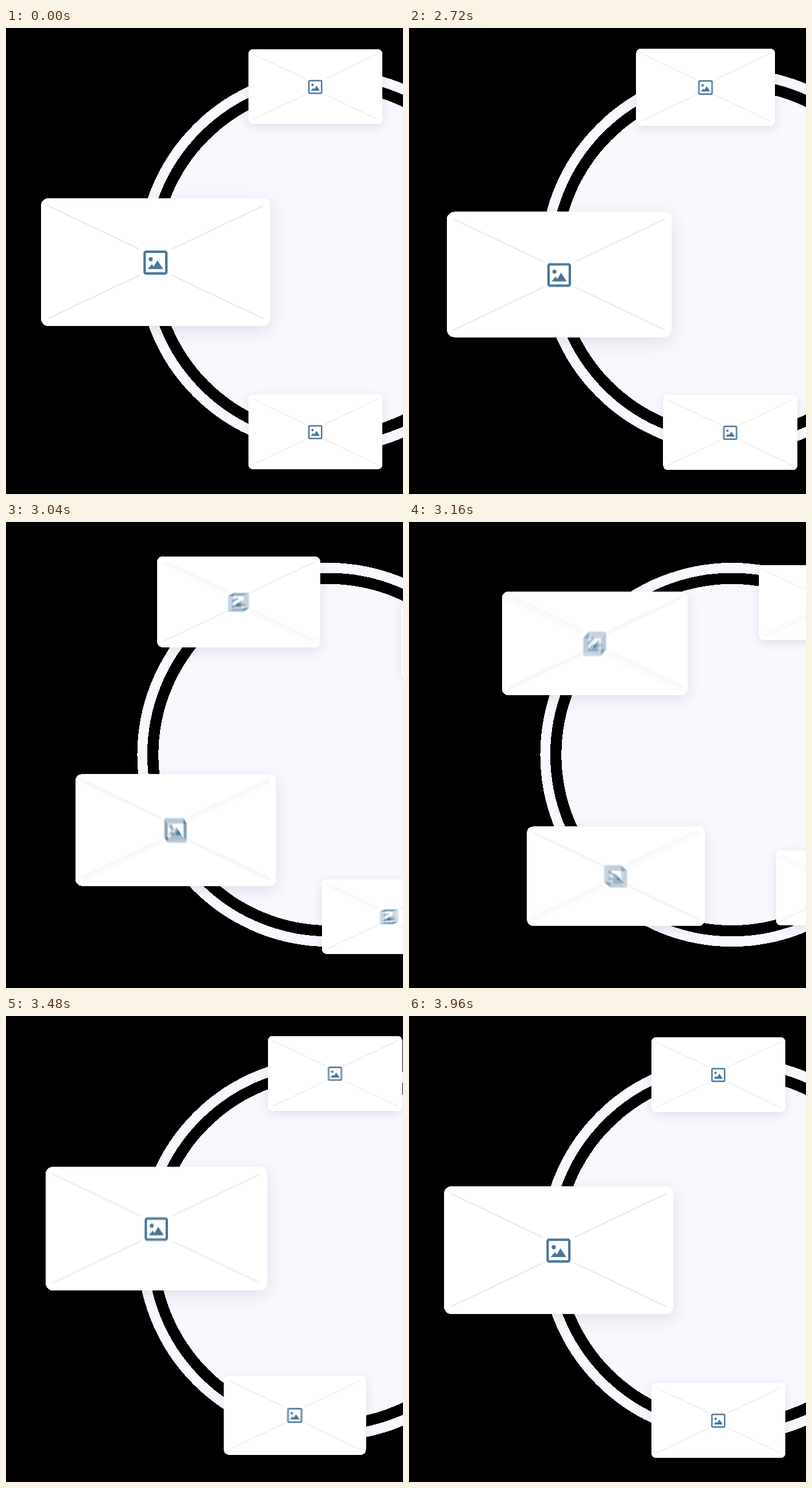
Write an HTML page with a canvas that moves like this. It is 691 px wide and 810 px high and loops after 4.84 s.

```html
<!DOCTYPE html>
<html lang="en">
<head>
<meta charset="utf-8">
<title>Card wheel</title>
<style>
  html, body { margin: 0; width: 100%; height: 100%; overflow: hidden; background: #000; }
  canvas { display: block; filter: url(#hard); }
  svg { position: absolute; }
</style>
</head>
<body>
<canvas id="stage" width="691" height="810"></canvas>
<!-- One-bit transparency: outlines against the backdrop are hard. -->
<svg width="0" height="0">
  <filter id="hard" x="0" y="0" width="1" height="1" color-interpolation-filters="sRGB">
    <feComponentTransfer><feFuncA type="discrete" tableValues="0 1"/></feComponentTransfer>
  </filter>
</svg>
<script>
const W = 691, H = 810;
const ctx = document.getElementById('stage').getContext('2d');
const layer = document.createElement('canvas');
layer.width = W;
layer.height = H;
const art = layer.getContext('2d');

const LOOP = 4840, START = 2372, SPAN = 1540, SHUTTER = 15, SAMPLES = 12;
const HUB = { x: 560, y: 402 };
const CARD = { w: 399, h: 222, r: 13 };
const SMALL = 233 / 399;
const BLUE = '#4a769c', PALE = '#f8f9ff';

// Each card travels one place counterclockwise; bend shifts its radius on the way.
const cards = [
  { from: [870, 320], to: [538.5, 102], size: [SMALL, SMALL], bend: () => 0 },
  { from: [538.5, 102], to: [260.5, 407], size: [SMALL, 1], bend: p => 34 * p * (1 - p) ** 2 },
  { from: [260.5, 407], to: [538.5, 703], size: [1, SMALL], bend: p => -61 * p * p * (1 - p) },
  { from: [538.5, 702], to: [861, 470], size: [SMALL, SMALL], bend: () => 0 }
];

const mix = (a, b, p) => a + (b - a) * p;

function polar([x, y]) {
  const dx = HUB.x - x, dy = y - HUB.y;
  return { a: Math.atan2(dy, dx), r: Math.hypot(dx, dy) };
}

for (const c of cards) {
  c.p0 = polar(c.from);
  c.p1 = polar(c.to);
}

// cubic-bezier(.7, 0, .3, 1)
function ease(x) {
  if (x <= 0) return 0;
  if (x >= 1) return 1;
  let lo = 0, hi = 1, s = 0.5;
  for (let i = 0; i < 24; i++) {
    s = (lo + hi) / 2;
    const v = 1 - s;
    if (2.1 * s * v * v + 0.9 * s * s * v + s ** 3 < x) lo = s; else hi = s;
  }
  return s * s * (3 - 2 * s);
}

function pose(c, t) {
  const p = ease((t - START) / SPAN);
  const a = mix(c.p0.a, c.p1.a, p);
  const r = mix(c.p0.r, c.p1.r, p) + c.bend(p);
  return {
    x: HUB.x - r * Math.cos(a),
    y: HUB.y + r * Math.sin(a),
    s: mix(c.size[0], c.size[1], p)
  };
}

function outline({ x, y, s }) {
  const path = new Path2D();
  path.roundRect(x - CARD.w * s / 2, y - CARD.h * s / 2, CARD.w * s, CARD.h * s, CARD.r * s);
  return path;
}

function drawWheel() {
  ctx.fillStyle = ctx.strokeStyle = PALE;
  ctx.beginPath();
  ctx.arc(562, 404.5, 296.7, 0, Math.PI * 2);
  ctx.fill();
  ctx.lineWidth = 17.5;
  ctx.beginPath();
  ctx.arc(562, 404.5, 324.8, 0, Math.PI * 2);
  ctx.stroke();
}

function drawBody(path, s) {
  ctx.save();
  ctx.shadowColor = 'rgba(45, 25, 55, 0.12)';
  ctx.shadowBlur = 30 * s;
  ctx.shadowOffsetY = 8 * s;
  ctx.fillStyle = '#fff';
  ctx.fill(path);
  ctx.restore();
}

function drawFace({ x, y, s }) {
  art.save();
  art.translate(x, y);
  art.scale(s, s);

  art.strokeStyle = '#e8e8e8';
  art.lineWidth = 2;
  art.beginPath();
  for (const sx of [-1, 1]) for (const sy of [-1, 1]) {
    art.moveTo(sx * 187, sy * 98);
    art.lineTo(sx * 28, sy * 22.5);
  }
  art.stroke();

  art.translate(-0.3, 0.8);
  art.strokeStyle = art.fillStyle = BLUE;
  art.lineWidth = 4.2;
  art.beginPath();
  art.roundRect(-18.9, -18.9, 37.8, 37.8, 2.5);
  art.stroke();
  art.beginPath();
  art.arc(-8.3, -6, 3.6, 0, Math.PI * 2);
  art.fill();
  art.beginPath();
  art.moveTo(-13.5, 11.3);
  art.lineTo(-6.5, 3);
  art.lineTo(-3, 7);
  art.lineTo(3.3, -4);
  art.lineTo(13.5, 11.3);
  art.fill();
  art.restore();
}

// Averages several moments inside the shutter time for motion blur.
function drawFaces(clip, t) {
  const n = t > START && t < START + SPAN ? SAMPLES : 1;
  ctx.save();
  ctx.clip(clip);
  for (let k = 0; k < n; k++) {
    const moment = t + ((k + 0.5) / n - 0.5) * SHUTTER;
    art.fillStyle = '#fff';
    art.fillRect(0, 0, W, H);
    for (const c of cards) drawFace(pose(c, moment));
    ctx.globalAlpha = 1 / (k + 1);
    ctx.drawImage(layer, 0, 0);
  }
  ctx.restore();
}

function frame() {
  const t = performance.now() % LOOP;
  const clip = new Path2D();
  ctx.clearRect(0, 0, W, H);
  drawWheel();
  for (const c of cards) {
    const at = pose(c, t), path = outline(at);
    drawBody(path, at.s);
    clip.addPath(path);
  }
  drawFaces(clip, t);
  requestAnimationFrame(frame);
}
frame();
</script>
</body>
</html>
```
